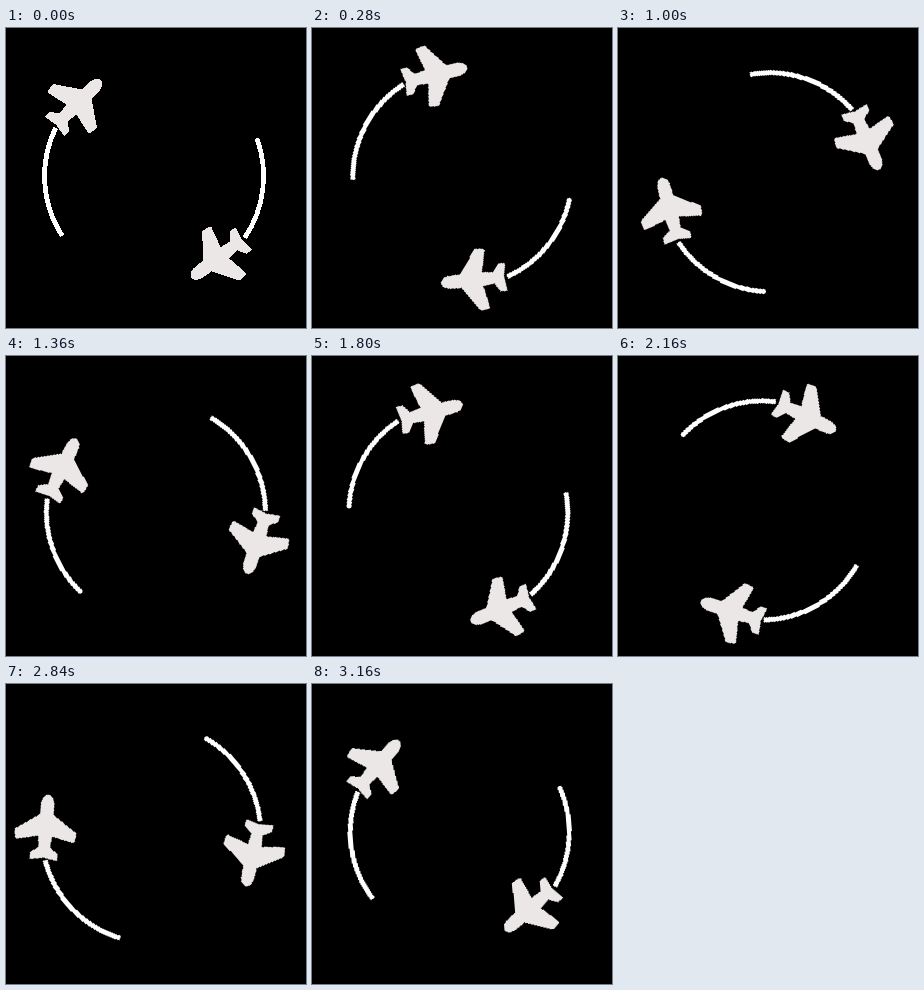
Animation, 300 px wide and 300 px high, one loop 3.2 s. Source, as an HTML page:

```html
<!DOCTYPE html>
<html lang="en">
<head>
<meta charset="utf-8">
<title>Circling planes</title>
<style>
  html, body { margin: 0; width: 100%; height: 100%; overflow: hidden; background: #000; }
  svg { display: block; width: 100%; height: 100%; shape-rendering: crispEdges; }
  #spin { transform-box: view-box; transform-origin: 148px 152.5px; }
  .trail { fill: none; stroke: #fff; stroke-width: 4.8; }
  .plane { fill: #ebe7e7; stroke: #ebe7e7; stroke-width: 3; stroke-linejoin: round; }
</style>
</head>
<body>
<svg viewBox="0 0 300 300"><g id="spin"></g></svg>
<script>
  const LOOP = 3200, STEPS = 80, RADIUS = 110;
  const spin = document.getElementById('spin');

  // Angles in degrees, clockwise from the right; each plane is placed by its nose.
  const flights = [
    { center: [148.6, 148], from: 147, to: 206, nose: [95, 52], heading: -45 },
    { center: [147.6, 148.2], from: -20.2, to: 34, nose: [185.4, 249.9], heading: 143 }
  ];

  // One side of the plane, nose at the origin and pointing right.
  const side = [[-12, 5.2], [-21, 5.4], [-37.5, 29.5], [-45, 28.5],
                [-40, 5.6], [-54, 4.2], [-59.5, 12.5], [-64, 12.5]];
  const mirror = side.map(([x, y]) => [x, -y]).reverse();
  const planePath = 'M-1.5 0C-1.5 3 -6 5.2 ' + side.join('L') +
    'L-62 0L' + mirror.join('L') + 'C-6 -5.2 -1.5 -3 -1.5 0Z';

  function add(cls, d, transform) {
    const el = document.createElementNS('http://www.w3.org/2000/svg', 'path');
    el.setAttribute('class', cls);
    el.setAttribute('d', d);
    if (transform) el.setAttribute('transform', transform);
    spin.append(el);
  }

  function onRing([x, y], deg) {
    const a = deg * Math.PI / 180;
    return [x + RADIUS * Math.cos(a), y + RADIUS * Math.sin(a)];
  }

  for (const { center, from, to, nose, heading } of flights) {
    add('trail', `M${onRing(center, from)}A${RADIUS} ${RADIUS} 0 0 1 ${onRing(center, to)}`);
    add('plane', planePath, `translate(${nose}) rotate(${heading})`);
  }

  spin.animate(
    [{ transform: 'rotate(0deg)' }, { transform: 'rotate(360deg)' }],
    { duration: LOOP, iterations: Infinity, easing: `steps(${STEPS})` }
  );
</script>
</body>
</html>
```
